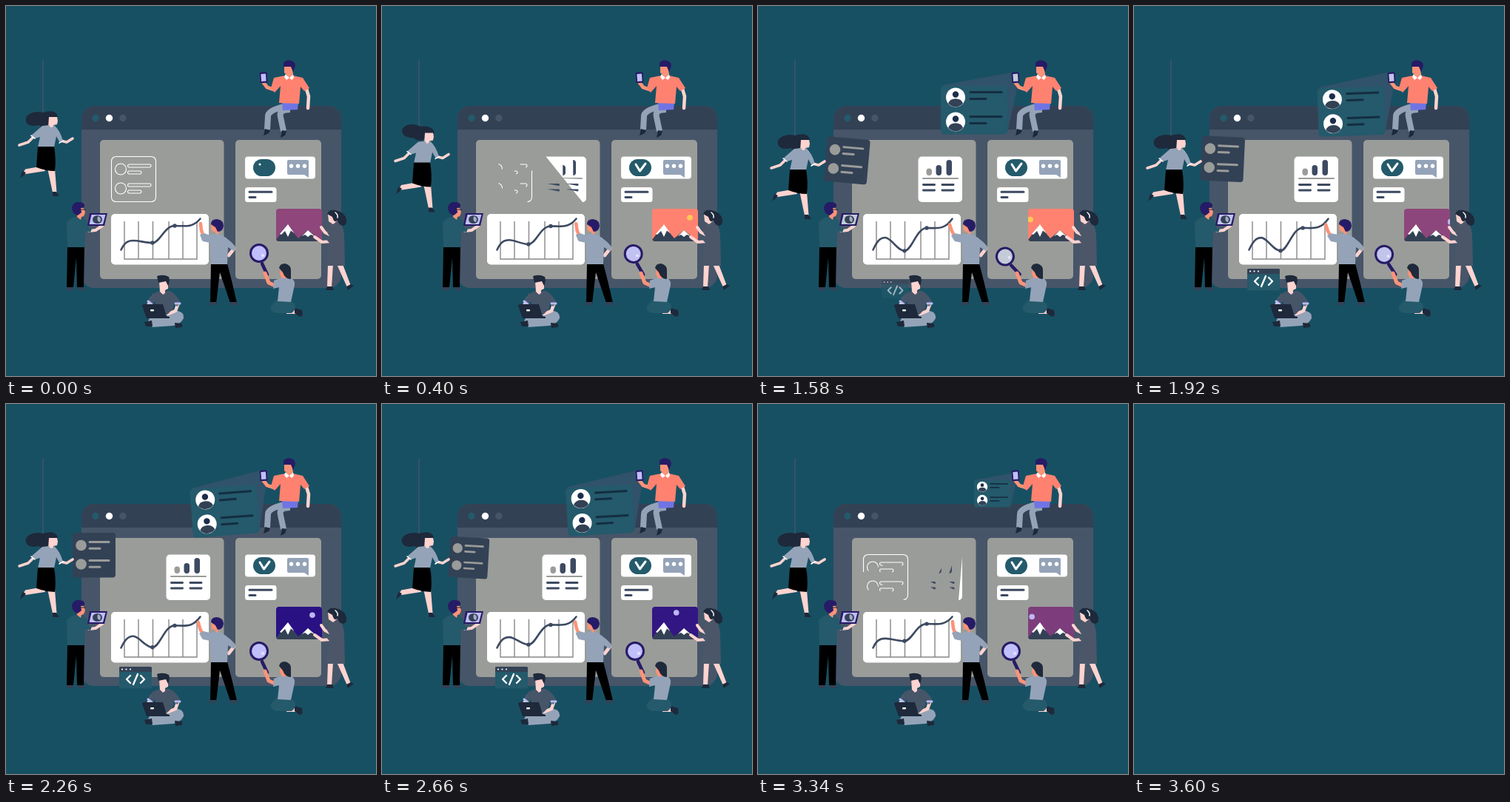
An HTML page that plays this animation: 500x500 px, repeating every 3.62 s.

```html
<!DOCTYPE html>
<html lang="en">
<head>
<meta charset="utf-8">
<title>Team building a web page</title>
<style>
html, body { margin: 0; height: 100%; overflow: hidden; background: #185063; }
svg { display: block; width: 100vw; height: 100vh; }
.white { fill: #fff } .ink { fill: #1e293b } .dark { fill: #334155 } .slate { fill: #475569 }
.mist { fill: #94a3b8 } .grey { fill: #9a9c99 } .teal { fill: #245a6b } .navy { fill: #261b66 }
.pink { fill: #ffd3cf } .peach { fill: #fc9378 } .coral { fill: #ff8270 } .black { fill: #000 }
.line { fill: none; stroke-width: 3; stroke-linecap: round; stroke-linejoin: round }
.s-white { stroke: #fff } .s-dark { stroke: #3d4a61 } .s-ink { stroke: #1e293b } .s-grey { stroke: #9a9c99 }
.s-pink { stroke: #ffd3cf } .s-peach { stroke: #fc9378 } .s-mist { stroke: #94a3b8 } .s-navy { stroke: #261b66 }
</style>
</head>
<body>
<svg id="stage" viewBox="0 0 500 500">
  <defs>
    <clipPath id="frame"><rect x="365" y="274" width="62" height="44" rx="4"/></clipPath>
    <g id="profile">
      <circle r="13" class="white"/><circle cy="-4" r="4.2" fill="#1b2d4a"/>
      <path d="M-10 8A10.5 9 0 0 1 10 8A13 13 0 0 1-10 8" class="dark"/>
      <path d="M20-7H62M20 2H41" class="line" stroke="#142d42"/>
    </g>
  </defs>

  <!-- browser window -->
  <rect x="102" y="135" width="351" height="246" rx="17" class="slate"/>
  <path d="M102 167V152a17 17 0 0 1 17-17H436a17 17 0 0 1 17 17V167Z" class="dark"/>
  <circle cx="121" cy="151.500" r="4.700" class="teal"/>
  <circle cx="139.500" cy="151.500" r="4.700" class="white"/>
  <circle cx="158" cy="151.500" r="4.700" class="slate"/>
  <rect x="127" y="181" width="167.500" height="188" rx="5" class="grey"/>
  <rect x="310" y="181" width="116" height="188" rx="5" class="grey"/>

  <g id="outline" class="line s-white" style="stroke-width:1.1;stroke-linecap:butt"></g>
  <g id="report"></g>

  <!-- message panel -->
  <rect x="323" y="203.500" width="95" height="30" rx="4" class="white"/>
  <rect x="334" y="207" width="30" height="23" rx="11.500" class="teal"/>
  <path id="check" d="M343 214L348.500 223L356 213" pathLength="1" class="line s-white"/>
  <path d="M382 208H407q2 0 2 2V232L403 228H382q-2 0-2-2V210q0-2 2-2" class="mist"/>
  <path d="M385.500 216.300h0M394.500 216.300h0M403.500 216.300h0" class="line s-white" style="stroke-width:5.500"/>
  <rect x="323" y="245" width="42.500" height="20" rx="3.500" class="white"/>
  <path d="M329 251.300H359M329 258.500H337" class="line s-dark"/>

  <!-- landscape -->
  <g clip-path="url(#frame)">
    <rect id="sky" x="365" y="274" width="62" height="44"/>
    <circle id="orb" r="3.800"/>
    <path d="M365 316L380 296L395 314L408 303L427 318H365" class="dark"/>
    <path d="M381 295L389.500 307L385 303.500L381 312L377 304L372 309L370 308ZM408 303L417 311L412 309L408 312L404 309L400 311Z" class="white"/>
  </g>

  <!-- line chart -->
  <rect x="142" y="281" width="132" height="68.500" rx="5" class="white"/>
  <path d="M160 291V342H258V291M179 291V342M198.500 291V342M220 291V342M239 291V342" fill="none" stroke="#888" stroke-width="1.400"/>
  <path id="curve" class="line s-dark" style="stroke-width:2.600"/>
  <circle id="low" cx="198" r="2.700" fill="#3d4a61"/>
  <circle id="high" cx="228" r="2.700" fill="#3d4a61"/>

  <!-- contact cards projected from the phone -->
  <g id="contacts">
    <path d="M249 107L344 89.500L352 103L337 171Z" fill="#30526a"/>
    <rect x="247" y="108" width="90" height="65.500" rx="5" class="teal"/>
    <use href="#profile" x="267" y="123.500"/><use href="#profile" x="267" y="156.500"/>
  </g>

  <!-- person on the roof -->
  <path d="M376 136Q354 141 354 149L353 167" class="line s-mist" style="stroke-width:8;stroke-linecap:butt"/>
  <path d="M384 140Q368 140 371 150L375 169" class="line s-mist" style="stroke-width:8;stroke-linecap:butt"/>
  <path d="M350 166L357 168L355 172L348 175ZM373 168L379 169L377 175L371 178Z" class="ink"/>
  <path d="M373 131H395L394 140L374 141Z" fill="#7074e4"/>
  <path d="M362 113L353 110L346 101" class="line s-peach" style="stroke-width:5"/>
  <path d="M406 112L409 122L408 138" class="line s-pink" style="stroke-width:4.500"/>
  <path d="M362 97L377 94H388L401 97L410 111L403 115L398 109L396 132L369 131L371 108L363 117L358 111Z" class="coral"/>
  <path d="M378 92L383 97L388 92L389 97L386 100L383 97L379 100L376 96Z" class="white"/>
  <path d="M376 81L386 80L388 92L383 97L379 93L376 90Z" class="peach"/>
  <path d="M375 82Q373 74 382 73Q391 74 391 81L388 89L385 82Z" class="navy"/>
  <rect x="343" y="89.500" width="10" height="14.500" rx="1.500" class="navy" transform="rotate(-4 348 97)"/>
  <rect x="344.800" y="91.800" width="6.500" height="10" class="glass" transform="rotate(-4 348 97)"/>

  <!-- list card and the person carrying it -->
  <g id="list">
    <rect x="90" y="174" width="58" height="60.500" rx="4" class="dark"/>
    <circle cx="101.500" cy="191" r="7.300" class="grey"/><circle cx="101.500" cy="216.500" r="7.300" class="grey"/>
    <path d="M113 186.500H139M113 195.300H127M113 211.500H139M113 220.300H127" class="line s-grey"/>
  </g>
  <path id="cable" fill="none" stroke="#405571" stroke-width="1.500"/>
  <g id="flyer">
    <path d="M51 247L26 251.500L23 257L27 258L53 254ZM56 250L66 251L68.500 283L63 283Z" class="pink"/>
    <path d="M22 254L27 256L24 260L19 264ZM63 282L68 282L72 288H63Z" class="ink"/>
    <path d="M39 206L30 215L18 219M74 213L82 215L90 210" class="line s-pink" style="stroke-width:3.600"/>
    <path id="hair" d="M70 180C68 172 58 172 50 175C40 172 28 176 26.500 184C27 193 36 194 44 192C50 196 58 193 60 188Z" class="ink"/>
    <path d="M58 181L69 181L70 186L69 191L64 192V196L57 195Z" class="pink"/>
    <path d="M49 193L58 192L61 196L65 192Q73 199 77 213L73 216L68 207L65 222H43L46 208L39 210L34 206Z" class="mist"/>
    <path d="M34 206L39 210M72 216L77 213" class="line s-white" style="stroke-width:1.500"/>
    <path d="M43 221H65Q68 238 66 254Q54 254 41 249Z" class="black"/>
  </g>

  <!-- person with tablet -->
  <path d="M83 325H106L105 380H96L95 340L91 380H82Z" class="black"/>
  <path d="M82 380H91V384H81ZM97 380H104L109 384H98Z" class="dark"/>
  <path d="M112 304L121 303L130 297" class="line s-pink" style="stroke-width:4"/>
  <path d="M82 292Q88 286 94 285H104Q111 290 112 300L116 301L114 306L107 304L106 326H83Z" class="teal"/>
  <path d="M95 273H105L107 279L105 284L102 285L101 289L96 285Z" class="peach"/>
  <path d="M89 272Q91 264 99 265Q107 265 106 272L101 273L102 279L97 283Q89 281 89 272" class="navy"/>
  <path d="M100 275H107" class="line s-ink" style="stroke-width:1"/>
  <path d="M113 280H137L133 297H110Z" class="navy"/>
  <path d="M115.500 282H134.500L131 295H112.500Z" class="glass"/>
  <ellipse cx="123.500" cy="288.500" rx="6.500" ry="5.500" class="dark"/>
  <path d="M124 284Q130 286 127 292Q122 291 124 284" fill="#a8abc8"/>

  <!-- floating code window -->
  <g id="code">
    <rect x="-22" y="-15" width="44" height="29.500" rx="2" class="teal"/>
    <path d="M-22-8V-13q0-2 2-2H20q2 0 2 2V-8Z" class="dark"/>
    <path d="M-18-11.500h0M-12.500-11.500h0M-7-11.500h0" class="line s-white" style="stroke-width:2.200"/>
    <path d="M-7-3L-12 2L-7 7M7-3L12 2L7 7M3-5L-3 9" class="line s-white" style="stroke-width:2.400"/>
  </g>

  <!-- person with laptop -->
  <path d="M203 412H232Q241 414 240 422Q236 430 226 432L198 434Q189 428 194 422Z" class="mist"/>
  <path d="M187 427L197 425L198 433H189ZM228 428L238 429V434L229 435Z" class="ink"/>
  <path d="M197 395L192 405M233 401L229 412L219 416" class="line s-pink" style="stroke-width:4.500"/>
  <path d="M198 389L208 385H221Q230 389 236 401L231 406L227 401L225 410L218 417L202 410V399L197 403L192 399Z" class="slate"/>
  <path d="M192 399L197 403M229 402H235" class="line" stroke="#b8bdf8" stroke-width="2"/>
  <path d="M207 372H219V382L215 384V388L212 390L208 386Z" class="pink"/>
  <path d="M204 365Q213 362 220 366Q222 371 219 378L216 372L206 374Z" class="ink"/>
  <path d="M184 405Q184 403 187 403H212L217 419L221 420V422H190Z" class="ink"/>
  <rect x="195" y="410" width="5" height="2.500" rx="1" class="white"/>

  <!-- person at the chart -->
  <path d="M277 348H299Q306 374 312 401H303L289 360L284 402H276Z" class="black"/>
  <path d="M276 400H284V404H273ZM303 400H312L314 404H302Z" class="dark"/>
  <path d="M308 328L301 337" class="line s-pink" style="stroke-width:4.500"/>
  <g id="reach">
    <path d="M267 312L264 303L263 294" class="line s-peach" style="stroke-width:4.500"/>
    <path d="M262 309L268 307L278 311L277 319L265 317Z" class="mist"/>
  </g>
  <path d="M264 313L277 309L285 307Q297 310 311 326L308 331L300 326L299 349H277L276 320L266 318Z" class="mist"/>
  <path d="M277 294H287L289 304L285 309L282 305L278 304Z" class="peach"/>
  <path d="M277 295Q277 288 285 288Q294 289 294 297Q293 305 286 305L283 299Z" class="navy"/>

  <!-- person with magnifier -->
  <g id="lens">
    <path d="M346 348L353 363" class="line s-navy" style="stroke-width:4.500"/>
    <circle cx="342" cy="334" r="11.500" class="glass" stroke="#261b66" stroke-width="3"/>
    <circle cx="347" cy="337" r="2" fill="#e6e6ff"/>
  </g>
  <path d="M364 378L355 374L350 361" class="line s-peach" style="stroke-width:5"/>
  <path d="M380 408L393 411L391 416H379Z" class="pink"/>
  <path d="M390 408L400 411L401 418L397 420L390 415Z" class="ink"/>
  <path d="M366 397L388 400Q395 408 386 415H365Q356 412 358 405Z" class="teal"/>
  <path d="M362 371L373 367H384Q391 370 390 377L385 400L367 399L369 380L361 382Z" class="mist"/>
  <path d="M371 354H380L381 368L373 368L370 362Z" class="peach"/>
  <path d="M369 354Q370 348 377 348Q386 350 385 359V369Q377 369 374 360Z" class="ink"/>

  <!-- person holding the picture -->
  <path d="M435 349H442L440 380H434ZM447 349H455L466 378L461 380Z" class="pink"/>
  <path d="M434 379H441L443 384H432ZM460 379L466 376L470 378L462 384Z" class="ink"/>
  <path d="M439 310L431 306L426 299M440 318L427 319L417 312" class="line s-pink" style="stroke-width:4"/>
  <path d="M437 293L451 291Q456 298 457 310L458 351H432L437 320L434 317L437 311L434 306Z" fill="#4b5768"/>
  <path d="M435 281H445L447 291L442 295L436 291Z" class="pink"/>
  <path d="M434 281Q436 275 445 276Q457 278 460 288Q461 295 456 297Q449 296 448 289Q444 295 441 285Z" class="ink"/>
  <path d="M445 279Q449 282 448 286" class="line s-white" style="stroke-width:1.500"/>
</svg>
<script>
const LOOP = 3620, NS = "http://www.w3.org/2000/svg";
const $ = id => document.getElementById(id);
const set = (el, name, value) => el.setAttribute(name, value);
const clamp = v => Math.min(1, Math.max(0, v));
const ramp = (t, a, b) => clamp((t - a) / (b - a));
const ease = (t, a, b) => { const p = ramp(t, a, b); return p * p * (3 - 2 * p); };
const pulse = (t, a, b, c, d) => ease(t, a, b) - ease(t, c, d);
const wave = (t, period) => (1 - Math.cos(2 * Math.PI * t / period)) / 2;
const mix = (a, b, p) => `rgb(${a.map((v, i) => Math.round(v + (b[i] - v) * p))})`;

// Piecewise linear value through [time, value] pairs
function track(t, ...keys) {
  const i = Math.max(1, keys.findIndex(k => k[0] >= t));
  const [a, va] = keys[i - 1], [b, vb] = keys[i];
  return va + (vb - va) * ramp(t, a, b);
}

// Both outlines run counter-clockwise, so trimming starts at the lower right
function box(x, y, w, h, r) {
  const turn = (dx, dy) => `a${r} ${r} 0 0 0 ${dx} ${dy}`;
  return `M${x + w - r} ${y + h}${turn(r, -r)}V${y + r}${turn(-r, -r)}H${x + r}${turn(-r, r)}V${y + h - r}${turn(r, r)}Z`;
}
const ring = (x, y, r) => `M${x + r} ${y}a${r} ${r} 0 1 0 ${-2 * r} 0a${r} ${r} 0 1 0 ${2 * r} 0`;

function addPath(parent, d, fill) {
  const el = parent.appendChild(document.createElementNS(NS, "path"));
  set(el, "d", d);
  if (fill) set(el, "fill", fill);
  return el;
}

const strokes = [box(142.5, 203.5, 60, 61, 6)];
for (const y of [220.5, 246.5])
  strokes.push(ring(155, y, 7.5), box(164.5, y - 6.5, 31.5, 4, 1.9), box(164.5, y + 2.5, 18.5, 4, 1.9));
const outline = strokes.map(d => addPath($("outline"), d));
outline.forEach(el => set(el, "pathLength", 1));

const INK = "#3d4a61", GREY = "#9a9c99";
const report = [
  [box(216.5, 203.5, 59.5, 61.5, 5), "#fff"],
  [box(227.5, 219.5, 7.5, 9.5, 3.7), GREY],
  [box(240.5, 215, 7.5, 14, 3.7), INK],
  [box(254.5, 208, 7.5, 21, 3.7), INK],
  [box(222, 232, 49, 2, 1), GREY],
  ...[240, 247.5].flatMap(y => [
    [box(222, y, 18, 3, 1.4), INK], [box(247.5, y, 18, 3, 1.4), INK]
  ])
].map(([d, fill]) => {
  const el = addPath($("report"), d, fill), length = el.getTotalLength();
  const points = Array.from({ length: 121 }, (_, i) => el.getPointAtLength(length * i / 120));
  return { el, d, points };
});

// Fills only the first part of each outline, closed by a chord
function trimReport(p) {
  $("report").style.display = p > 0 ? "" : "none";
  for (const { el, d, points } of report) {
    const part = points.slice(0, Math.round(p * 120) + 1);
    set(el, "d", p >= 1 ? d : "M" + part.map(q => `${q.x} ${q.y}`).join("L"));
  }
}

function draw(t) {
  $("stage").style.display = t < 3600 ? "" : "none";

  const drop = -31 * (1 - ramp(t, 0, 900)) ** 2;
  set($("flyer"), "transform", `translate(0 ${drop})`);
  set($("cable"), "d", `M50 73V${176 + drop}`);
  set($("hair"), "transform", `rotate(${12 * Math.sin(Math.PI * ramp(t, 0, 900))} 64 184)`);

  const drawn = 1 - ease(t, 0, 560) + ease(t, 3000, 3590);
  $("outline").style.display = drawn > 0 ? "" : "none";
  outline.forEach(el => set(el, "stroke-dasharray", `${drawn} 2`));
  trimReport(pulse(t, 0, 800, 2820, 3600));

  const list = pulse(t, 560, 900, 2600, 2930);
  const tilt = t > 960 ? 5 * wave(t - 960, 1300) : 0;
  set($("list"), "transform", `rotate(${tilt} 67 222) translate(91 210) scale(${list}) translate(-91 -210)`);

  const check = ramp(t, 0, 380);
  set($("check"), "stroke-dasharray", `${check} 2`);
  $("check").style.display = check ? "" : "none";

  const half = LOOP / 2, x = 432.2 - 0.0405 * (t % half);
  set($("orb"), "cx", x);
  set($("orb"), "cy", 282 + 0.009 * (x - 395) ** 2);
  set($("orb"), "fill", t < half ? "#ffc857" : "#bdb7f5");
  const day = track(t, [0, .47], [380, 1], [1600, 1], [2200, 0], [2600, 0], [3040, .31], [LOOP, .47]);
  set($("sky"), "fill", mix([41, 17, 132], [255, 130, 112], day));

  const w = wave(t + 90, LOOP), hump = 317 - 4 * w, low = 320 + 11 * w, high = 297 + 3 * w;
  set($("curve"), "d", `M155.500 329.500C160 320 164 ${hump} 172 ${hump}S188 ${low} 198 ${low}S214 ${high} 228 ${high}S252 ${high + 3} 262.500 287.500`);
  set($("low"), "cy", low);
  set($("high"), "cy", high);
  set($("reach"), "transform", `rotate(${-11 * w} 268 315)`);

  const cards = pulse(t, 1050, 1500, 3150, 3560);
  const lean = t > 1540 ? -4.5 * wave(t - 1540, 1660) : 0;
  set($("contacts"), "transform", `translate(347 97) rotate(${lean}) scale(${cards}) translate(-347 -97)`);

  const code = pulse(t, 1250, 1850, 2750, 3320);
  set($("code"), "transform", `translate(${200 - 25 * code} ${400 - 30 * code}) scale(${.6 + .4 * code})`);
  set($("code"), "opacity", code);

  const search = track(t, [0, 0], [1500, 1], [1600, 1], [2200, 0], [LOOP, 0]);
  set($("lens"), "transform", `rotate(${-18.5 * search} 352 361)`);
  const glass = mix([192, 190, 251], [196, 203, 216], search);
  document.querySelectorAll(".glass").forEach(el => set(el, "fill", glass));
}

const start = performance.now();
function tick() {
  draw((performance.now() - start) % LOOP);
  requestAnimationFrame(tick);
}
tick();
</script>
</body>
</html>
```
